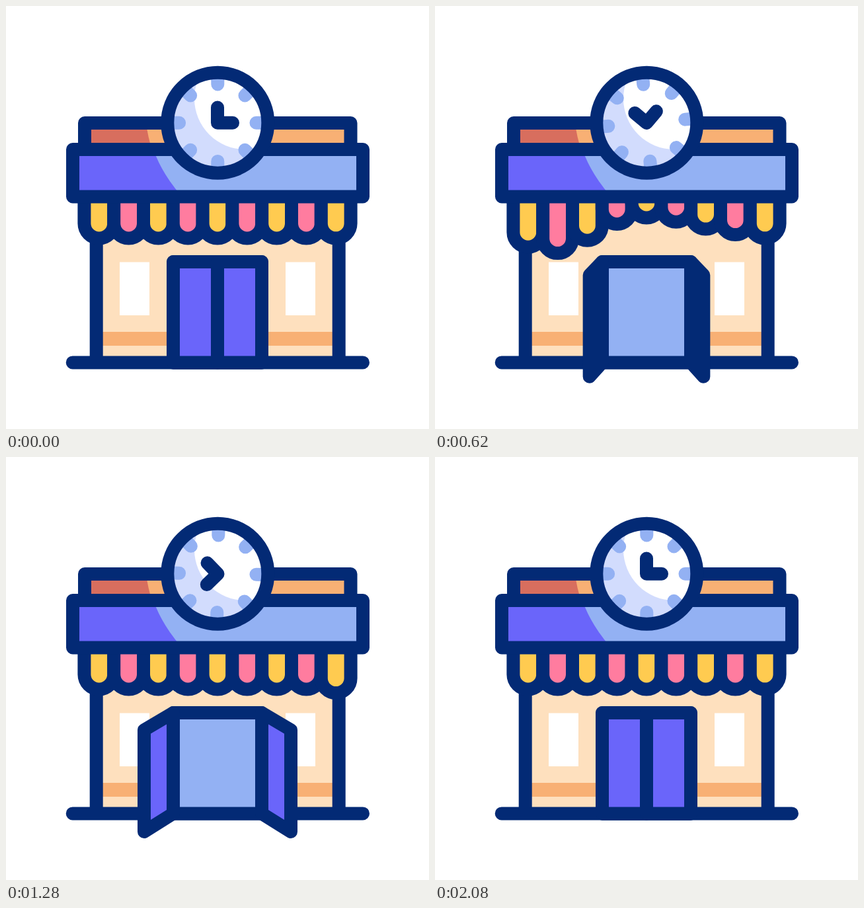
Write an HTML page that moves like this. It is 640 by 640 pixels and loops after 2.4 s.

```html
<!DOCTYPE html>
<html lang="en">
<head>
<meta charset="utf-8">
<title>Clock shop</title>
<style>
  html, body { margin: 0; width: 100%; height: 100%; overflow: hidden; background: #fff; }
  svg { display: block; width: 100%; height: 100%; }
  .line { stroke: #032a75; stroke-width: 20; stroke-linecap: round; stroke-linejoin: round; }
  .ray { stroke: #ffcb50; stroke-width: 20; stroke-linecap: round; }
</style>
</head>
<body>
<svg viewBox="0 0 640 640" fill="none">
  <defs>
    <clipPath id="face"><circle cx="320.3" cy="176.7" r="70"/></clipPath>
  </defs>

  <!-- walls -->
  <path fill="#fee0be" d="M137 290H504V539H137Z"/>
  <path fill="#f8b074" d="M137 493H504V514H137Z"/>
  <path fill="#fff" d="M172 387.5h45v80.5h-45ZM423 387.5h45v80.5h-45Z"/>
  <path class="line" d="M136.7 320V539.4M503.7 320V539.4M100.7 539.4H540"/>

  <!-- doorway -->
  <path class="line" fill="#93b1f3" d="M253 387H387V539.4H253Z"/>
  <g id="doors"></g>

  <g id="awning"></g>

  <!-- roof -->
  <path fill="#f8b074" d="M119 177H521V217H119Z"/>
  <path fill="#d86e5e" d="M119 177H212Q214.500 198 221 217H119Z"/>
  <path class="line" d="M119 217V177H521.500V217"/>
  <path fill="#93b1f3" d="M101 217H540V288H101Z"/>
  <path fill="#6a65fa" d="M101 217H223Q236 254 266 288H101Z"/>
  <path class="line" d="M101 217H540V288.500H101Z"/>

  <!-- clock -->
  <g clip-path="url(#face)">
    <circle cx="320.3" cy="176.7" r="76" fill="#d2dcfd"/>
    <circle cx="362" cy="140" r="77" fill="#fff"/>
    <g id="ticks" stroke="#93b1f3" stroke-width="20" stroke-linecap="round"></g>
  </g>
  <circle class="line" cx="320.3" cy="176.7" r="76"/>
  <path id="hands" class="line" d="M320 153.500V176.700H343"/>

  <g id="rays"></g>
</svg>

<script>
const LOOP = 2400;
const $ = id => document.getElementById(id);

function add(parent, attrs) {
  const el = document.createElementNS('http://www.w3.org/2000/svg', 'path');
  for (const key in attrs) el.setAttribute(key, attrs[key]);
  return parent.appendChild(el);
}

// Eased progress, 0 to 1, of a move between two times.
function ease(t, start, end) {
  const u = Math.min(1, Math.max(0, (t - start) / (end - start)));
  return u * u * (3 - 2 * u);
}

const doors = [[253, 1], [387, -1]].map(([hinge, side]) => ({
  hinge, side, el: add($('doors'), { class: 'line', fill: '#6a65fa' })
}));

const flapStarts = [13, 94, 195, 264, 330, 408, 482, 542, 624];
const flaps = flapStarts.map((start, i) => ({
  start,
  x: 140.8 + 44.8 * i,
  el: add($('awning'), { class: 'line', fill: i % 2 ? '#ff7c9f' : '#ffcb50' })
}));

for (let i = 0; i < 8; i++) {
  add($('ticks'), { d: 'M320.3 104V118.500', transform: `rotate(${i * 45} 320.3 176.7)` });
}

// Inner point and outer point of each ray.
const rays = [
  [384, 70, 406, 32.7],
  [415, 98, 445.5, 76.7],
  [424, 131, 464, 131]
].map(points => ({ points, el: add($('rays'), { class: 'ray' }) }));

function drawDoors(t) {
  const open = ease(t, 190, 810) - ease(t, 1326, 1871);
  for (const { hinge, side, el } of doors) {
    const x = hinge + side * (67 - 111 * open);
    el.setAttribute('d',
      `M${hinge} 387L${x} ${387 + 26 * open}V${539.4 + 27.5 * open}L${hinge} 539.4Z`);
  }
}

function drawAwning(t) {
  for (const { start, x, el } of flaps) {
    const s = t - start;
    const shift = -31 * ease(s, 0, 300) + 54 * ease(s, 300, 513) - 23 * ease(s, 513, 726);
    const r = 22.4, y = 329 + shift;
    el.setAttribute('d', `M${x - r} 288V${y}A${r} ${r} 0 0 0 ${x + r} ${y}V288`);
  }
}

function drawClock(t) {
  const angle = -50 * ease(t, 0, 560) + 410 * ease(t, 685, 1650);
  const turn = `rotate(${angle} 320.3 176.7)`;
  $('ticks').setAttribute('transform', turn);
  $('hands').setAttribute('transform', turn);
}

function drawRays(t) {
  const tip = ease(t, 1600, 1765), tail = ease(t, 1620, 2030);
  $('rays').setAttribute('visibility', tip > 0 && tail < 1 ? 'visible' : 'hidden');
  for (const { points: [x0, y0, x1, y1], el } of rays) {
    const at = k => `${x0 + (x1 - x0) * k} ${y0 + (y1 - y0) * k}`;
    el.setAttribute('d', `M${at(tail)}L${at(tip)}`);
  }
}

function draw(t) {
  drawDoors(t);
  drawAwning(t);
  drawClock(t);
  drawRays(t);
}

const begin = performance.now();
function frame() {
  draw((performance.now() - begin) % LOOP);
  requestAnimationFrame(frame);
}
draw(0);
requestAnimationFrame(frame);
</script>
</body>
</html>
```
